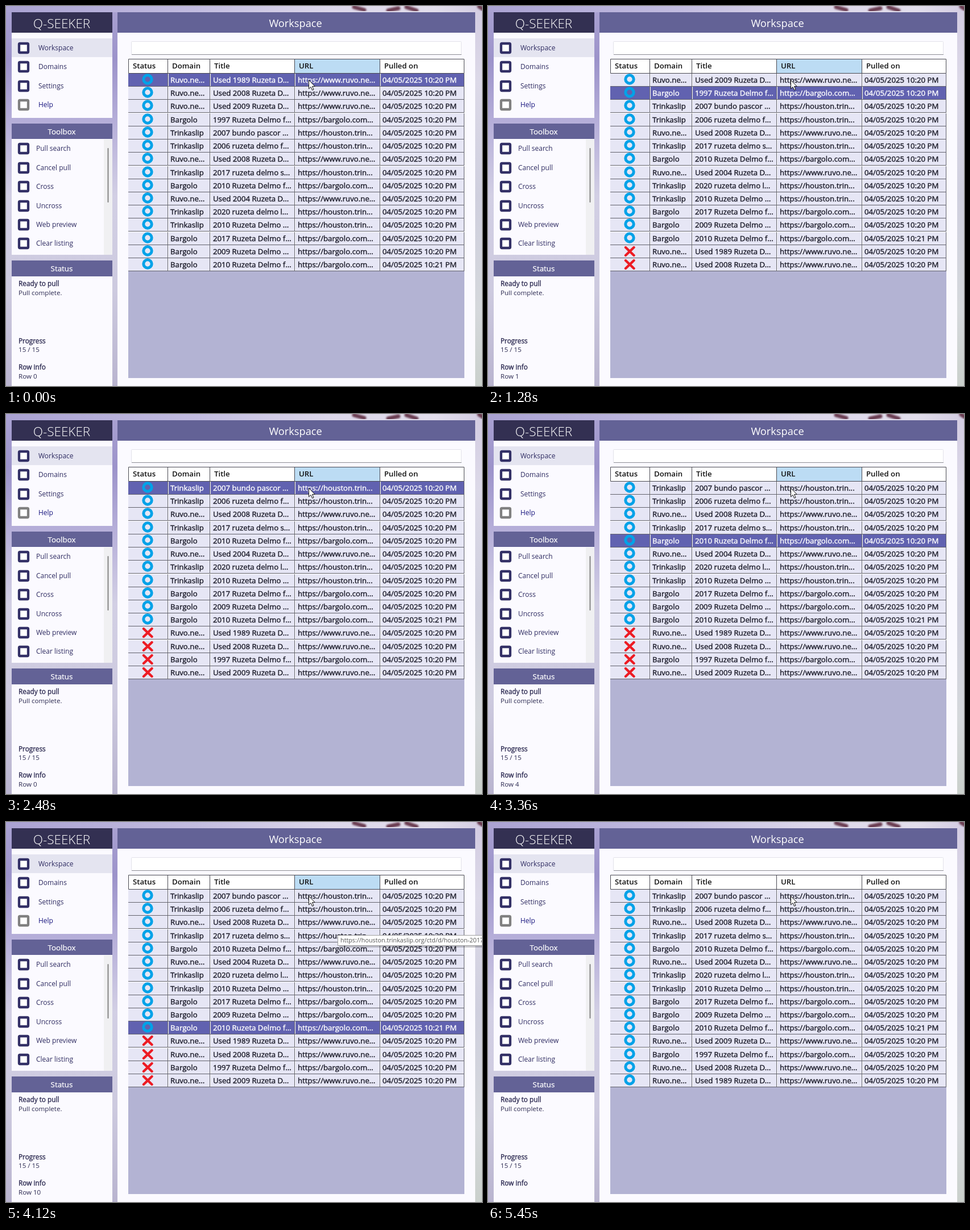
An HTML page that plays this animation: 837x669 px, repeating every 5.77 s.

```html
<!DOCTYPE html>
<html lang="en">
<head>
<meta charset="utf-8">
<title>Workspace</title>
<style>
  html, body { margin: 0; width: 100%; height: 100%; overflow: hidden; }
  svg { display: block; width: 837px; height: 669px; font-family: "Open Sans", "Noto Sans", sans-serif; }
  text { white-space: pre; }
  .panel { fill: #fbfaff; }
  .bar { fill: #636296; }
  .caption { fill: #fff; stroke: #fff; stroke-width: .25; text-anchor: middle; font-size: 13.4px; }
  .menu { fill: #2f2c62; font-size: 12px; }
  .info { fill: #2b2950; font-size: 11.6px; }
  .label { stroke: #2b2950; stroke-width: .35; font-size: 11.8px; }
  .box { fill: #fff; stroke: #333066; stroke-width: 4.3; }
  .head { fill: #111; font-size: 13.2px; font-weight: 600; }
  .row text { fill: #1d1d2b; stroke: #1d1d2b; stroke-width: .4; font-size: 13.2px; }
  .row .fill { fill: #e6e6f5; }
  .row.sel .fill { fill: #6162b0; }
  .row.sel text { fill: #fff; stroke: #fff; }
  .ring { fill: none; stroke: #00a2e8; stroke-width: 5; }
  .x { fill: none; stroke: #ed1c24; stroke-width: 4.4; stroke-linecap: round; display: none; }
  .crossed .x { display: inline; }
  .crossed .ring { display: none; }
</style>
</head>
<body>
<svg viewBox="0 0 837 669">
  <defs>
    <linearGradient id="left" x2="0" y2="1">
      <stop offset="0" stop-color="#aaa2d2"/>
      <stop offset=".14" stop-color="#9c93ca"/>
      <stop offset=".32" stop-color="#b8b1da"/>
      <stop offset=".5" stop-color="#d2cfe4"/>
      <stop offset=".75" stop-color="#cdcadf"/>
      <stop offset="1" stop-color="#b9b4cf"/>
    </linearGradient>
    <linearGradient id="right" x2="0" y2="1">
      <stop offset="0" stop-color="#d3cce2"/>
      <stop offset=".2" stop-color="#dcd9e8"/>
      <stop offset=".5" stop-color="#cfcfde"/>
      <stop offset=".8" stop-color="#d5d8dc"/>
      <stop offset="1" stop-color="#cad0cc"/>
    </linearGradient>
    <linearGradient id="top">
      <stop offset="0" stop-color="#aaa2d2"/>
      <stop offset=".4" stop-color="#c2bce0"/>
      <stop offset=".68" stop-color="#dcd7ea"/>
      <stop offset=".9" stop-color="#e2deec"/>
      <stop offset="1" stop-color="#d3cce2"/>
    </linearGradient>
    <filter id="soft"><feGaussianBlur stdDeviation="1.8"/></filter>
  </defs>

  <rect width="500" height="669" fill="url(#left)"/>
  <rect x="500" width="337" height="669" fill="url(#right)"/>
  <rect width="837" height="11" fill="url(#top)"/>
  <g filter="url(#soft)" fill="none" stroke="#693a50" stroke-width="7" stroke-linecap="round">
    <path d="M612 2L630 7M672 8L690 4M704 2L722 8M832 1L840 6"/>
  </g>

  <rect class="panel" x="10" y="47" width="177" height="150"/>
  <rect x="10" y="11" width="177" height="36" fill="#333052"/>
  <text x="98" y="39" fill="#fff" font-size="22.5" font-weight="300" text-anchor="middle">Q-SEEKER</text>
  <rect x="10" y="57" width="177" height="33" fill="#e4e4f0"/>

  <rect class="panel" x="10" y="234" width="177" height="204"/>
  <rect class="bar" x="10" y="207" width="177" height="27"/>
  <text class="caption" x="98" y="226">Toolbox</text>
  <rect x="172" y="235" width="15" height="203" fill="#f0f0f2"/>
  <rect x="178.500" y="250" width="2" height="96" rx="1" fill="#858585"/>
  <g id="menu"></g>

  <rect class="panel" x="10" y="476" width="177" height="193"/>
  <rect class="bar" x="10" y="448" width="177" height="28"/>
  <text class="caption" x="98" y="467">Status</text>
  <text class="info label" x="22" y="493">Ready to pull</text>
  <text class="info" x="22" y="509">Pull complete.</text>
  <text class="info label" x="22" y="594">Progress</text>
  <text class="info" x="22" y="609">15 / 15</text>
  <text class="info label" x="22" y="640">Row info</text>
  <text class="info" x="22" y="656" id="info"></text>

  <rect class="panel" x="196" y="47" width="629" height="622"/>
  <rect class="bar" x="196" y="11" width="629" height="36"/>
  <text x="509" y="37" fill="#fff" font-size="18.2" text-anchor="middle">Workspace</text>
  <rect x="220.500" y="62.500" width="580" height="23" rx="1" fill="#fff" stroke="#e2e2ea"/>
  <path d="M221 85.500H801" stroke="#8c8c94"/>

  <rect x="215" y="94" width="591" height="373" fill="#fff"/>
  <rect x="215" y="466" width="591" height="189" fill="#b3b3d3"/>
  <rect id="hover" x="508" y="94" width="149" height="24" fill="#bcdcf4"/>
  <g id="heads"></g>
  <path d="M215.500 93.500H805.500V118.500H215.500ZM284.500 94V118M358.500 94V118M507.500 94V118M657.500 94V118" fill="none" stroke="#4a4a52"/>
  <g id="rows"></g>

  <g id="tip">
    <rect x="3" y="4" width="270" height="18" fill="#000" opacity=".2"/>
    <rect x=".5" y=".5" width="270" height="18" fill="#fff" stroke="#a0a0a0"/>
    <text x="5" y="13" font-size="10.8" fill="#575757"></text>
  </g>
  <path d="M532.500 130.500V145.800L536 142.500L538.600 148.200L541 147.100L538.500 141.500H543.200Z" fill="#fff" stroke="#111"/>
</svg>

<script>
const LOOP = 5770, TOP = 119, PITCH = 23.22;
const $ = id => document.getElementById(id);

function add(parent, tag, attrs, text = '') {
  const el = document.createElementNS('http://www.w3.org/2000/svg', tag);
  for (const k in attrs) el.setAttribute(k, attrs[k]);
  el.textContent = text;
  return parent.appendChild(el);
}

function menuItem(name, x, middle) {
  const y = Math.round(middle);
  const box = add($('menu'), 'rect', { class: 'box', x: 23, y: y - 8, width: 16, height: 16, rx: 1.5 });
  const label = add($('menu'), 'text', { class: 'menu', x, y: y + 4 }, name);
  if (name === 'Help') {
    box.style.stroke = '#808080';
    label.style.fill = '#1b1880';
  }
}
['Workspace', 'Domains', 'Settings', 'Help'].forEach((n, i) => menuItem(n, 57, 74 + 33.4 * i));
['Pull search', 'Cancel pull', 'Cross', 'Uncross', 'Web preview', 'Clear listing']
  .forEach((n, i) => menuItem(n, 53, 251.3 + 33.4 * i));

[['Status', 223], ['Domain', 292], ['Title', 366], ['URL', 515], ['Pulled on', 665]]
  .forEach(([name, x]) => add($('heads'), 'text', { class: 'head', x, y: 110 }, name));

const SITES = {
  r: ['Ruvo.ne...', 'https://www.ruvo.ne...'],
  t: ['Trinkaslip', 'https://houston.trin...'],
  b: ['Bargolo', 'https://bargolo.com...']
};
const LISTINGS = [
  'r Used 1989 Ruzeta D...', 'r Used 2008 Ruzeta D...', 'r Used 2009 Ruzeta D...',
  'b 1997 Ruzeta Delmo f...', 't 2007 bundo pascor ...', 't 2006 ruzeta delmo f...',
  'r Used 2008 Ruzeta D...', 't 2017 ruzeta delmo s...', 'b 2010 Ruzeta Delmo f...',
  'r Used 2004 Ruzeta D...', 't 2020 ruzeta delmo l...', 't 2010 Ruzeta Delmo ...',
  'b 2017 Ruzeta Delmo f...', 'b 2009 Ruzeta Delmo ...', 'b 2010 Ruzeta Delmo f...'
];

const rows = LISTINGS.map((item, i) => {
  const g = add($('rows'), 'g', { class: 'row' });
  const [domain, url] = SITES[item[0]];
  add(g, 'rect', { class: 'fill', x: 215, width: 591, height: 22 });
  add(g, 'rect', { x: 215, y: 22, width: 591, height: 1, fill: '#62626c' });
  for (const x of [284, 358, 507, 657, 805]) {
    add(g, 'rect', { x, width: 1, height: 23, fill: '#62626c' });
    if (x < 805) add(g, 'rect', { x: x + 1, width: 1, height: 22, fill: '#fff' });
  }
  add(g, 'circle', { class: 'ring', cx: 249, cy: 10, r: 7.2 });
  add(g, 'path', { class: 'x', d: 'M242 4L256.500 18M256.500 4L242 18' });
  const cells = [[289, domain], [364, item.slice(2)], [513, url], [662, `04/05/2025 10:${i === 14 ? 21 : 20} PM`]];
  for (const [x, text] of cells) add(g, 'text', { x, y: 16 }, text);
  return g;
});

// Each action turns one state into the next.
const select = (from, to = from) => s => ({
  ...s, from, to, info: from === to ? `Row ${from}` : `Rows ${from},${to}`
});
const cross = slot => s => {
  const order = s.order.filter((_, i) => i !== slot);
  return { ...s, order: [...order, s.order[slot]], crossed: s.crossed + 1 };
};
const uncross = s => {
  const split = s.order.length - s.crossed;
  return {
    ...s, order: [...s.order.slice(0, split), ...s.order.slice(split).reverse()],
    crossed: 0, from: -1, to: -1, info: '', hover: false
  };
};
const tip = (text, x = 583, y = 199) => s => ({ ...s, tip: text && { text, x, y } });
const link = path => `https://houston.trinkaslip.org/${path}-`;

const STEPS = [
  [0, select(0)], [160, cross(0)], [520, select(1)], [840, select(0)],
  [960, tip(link('cto/d/houston-2007'))], [1040, tip(null)], [1080, cross(0)],
  [1280, select(1)], [1840, cross(1)], [2240, select(0)], [2480, cross(0)],
  [2960, select(1)], [3040, select(2)], [3200, select(3)],
  [3360, select(4)], [3440, select(5)], [3520, select(6)], [3720, select(7)],
  [3800, tip(link('cto/d/houston-2006'), 583, 147)],
  [3840, select(8)], [3840, tip(link('ctd/d/houston-2017'))],
  [3960, select(9)], [4120, select(10)], [4240, select(11)],
  [4520, select(11, 12)], [4640, select(11, 13)], [4800, select(11, 14)],
  [5200, uncross], [5450, tip(null)]
];

let state = { order: rows.map((_, i) => i), crossed: 0, hover: true, tip: null };
const timeline = STEPS.map(([time, act]) => ({ time, state: state = act(state) }));

function draw(s) {
  s.order.forEach((id, slot) => {
    const row = rows[id];
    row.setAttribute('transform', `translate(0 ${Math.round(TOP + PITCH * slot)})`);
    row.classList.toggle('sel', slot >= s.from && slot <= s.to);
    row.classList.toggle('crossed', slot >= rows.length - s.crossed);
  });
  $('info').textContent = s.info;
  $('hover').style.display = s.hover ? '' : 'none';
  $('tip').style.display = s.tip ? '' : 'none';
  if (s.tip) {
    $('tip').setAttribute('transform', `translate(${s.tip.x} ${s.tip.y})`);
    $('tip').lastElementChild.textContent = s.tip.text;
  }
}

let shown;
function tick() {
  const t = performance.now() % LOOP;
  const now = timeline.findLast(step => step.time <= t).state;
  if (now !== shown) draw(shown = now);
  requestAnimationFrame(tick);
}
tick();
</script>
</body>
</html>
```
